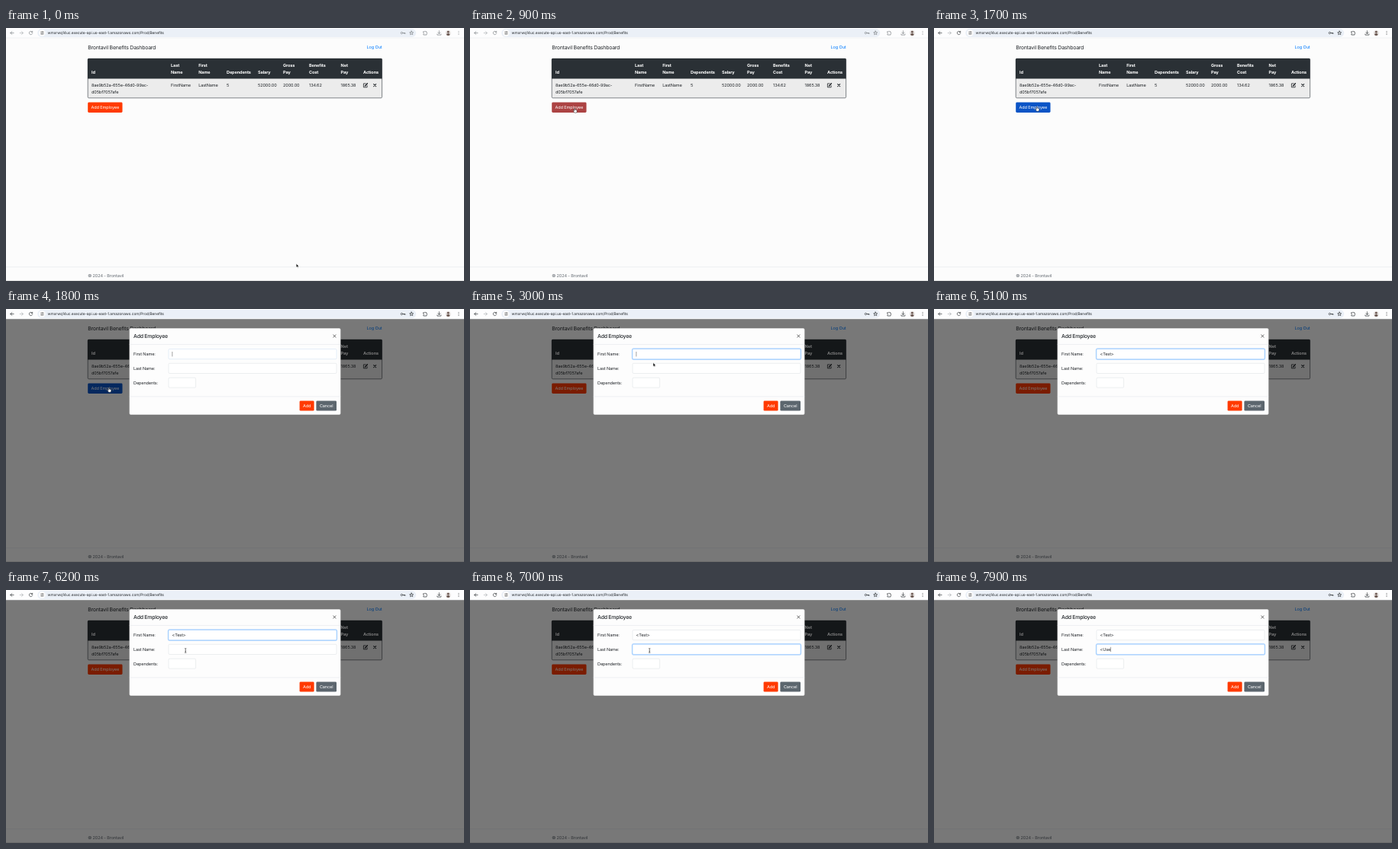
An HTML page that plays this animation: 600 px wide and 332 px high, repeating every 8 s.

```html
<!DOCTYPE html>
<html lang="en">
<head>
<meta charset="utf-8">
<title>Benefits Dashboard</title>
<style>
html, body { margin: 0; width: 100%; height: 100%; overflow: hidden; background: #fcfcfc; }
svg { display: block; width: 100vw; height: 100vh; }
text { font: 400 5.55px Inter, "Open Sans", sans-serif; letter-spacing: -.02em; fill: #212529; text-rendering: geometricPrecision; white-space: pre; }
.th { font-weight: 700; fill: #fff; }
.brand { font-size: 6.94px; letter-spacing: -.032em; }
.title { font-size: 6.94px; font-weight: 500; letter-spacing: -.034em; }
.url { font-size: 4.86px; letter-spacing: -.01em; }
.light { fill: #fff; }
.mid { text-anchor: middle; }
.line { fill: none; stroke-width: .75; stroke-linecap: round; stroke-linejoin: round; }
.input { fill: #fff; stroke: #ced4da; stroke-width: .4; }
</style>
</head>
<body>
<svg id="stage" viewBox="0 0 600 332" preserveAspectRatio="none">
  <rect width="600" height="332" fill="#fcfcfc"/>

  <g id="page">
    <text class="brand" x="107.2" y="27.5">Brontavil Benefits Dashboard</text>
    <text x="472.6" y="27" style="fill:#007bff">Log Out</text>
    <rect x="107.2" y="40.2" width="385.4" height="51.6" rx="1.4" fill="#ececec" stroke="#32383e" stroke-width=".6"/>
    <path d="M107 66.6V41.4q0-1.4 1.4-1.4H491.3q1.4 0 1.4 1.4V66.6Z" fill="#2a3035"/>
    <g id="table"></g>
    <g class="line" stroke="#212529" style="stroke-width:.8">
      <path d="M471.2 72.9H468.4V77.8H473.1V75.6"/>
      <path d="M470.4 75.9L473.4 72.7" style="stroke-width:1.4"/>
      <path d="M481.7 73.7L484.7 76.7M484.7 73.7L481.7 76.7" style="stroke-width:1.1"/>
    </g>
    <rect id="open" x="107.2" y="97.5" width="45.3" height="13.4" rx="1.4"/>
    <text class="light mid" x="129.8" y="106.3">Add Employee</text>
    <path d="M0 313.6H600" stroke="#dee2e6" stroke-width=".5"/>
    <text x="107.2" y="326.6" style="fill:#666d74">© 2024 - Brontavil</text>
    <rect y="331.4" width="600" height=".6" fill="#cfcfcf"/>
  </g>

  <g id="modal">
    <rect y="13" width="600" height="319" fill="#000" opacity=".52"/>
    <rect x="161.6" y="25.2" width="276.8" height="113.6" rx="1.7" fill="#fdfdfd" stroke="#000" stroke-opacity=".2" stroke-width=".4"/>
    <text class="title" x="167" y="38.3">Add Employee</text>
    <path class="line" d="M428.8 33.9L432 37.1M432 33.9L428.8 37.1" stroke="#333"/>
    <path d="M161.6 46.5H438.4M161.6 114.9H438.4" stroke="#dee2e6" stroke-width=".5"/>
    <text x="167" y="61.2">First Name:</text>
    <text x="167" y="79.9">Last Name:</text>
    <text x="167" y="98.7">Dependents:</text>
    <g id="fields"></g>
    <rect class="input" x="213" y="90.2" width="35.6" height="13" rx="1.4"/>
    <rect x="384.6" y="120.4" width="19" height="13.2" rx="1.4" fill="#ff3a00"/>
    <text class="light mid" x="394.1" y="129">Add</text>
    <rect x="406.4" y="120.4" width="26.6" height="13.2" rx="1.4" fill="#5c666e"/>
    <text class="light mid" x="419.7" y="129">Cancel</text>
  </g>

  <g id="toolbar">
    <rect width="600" height="13" fill="#fdfdfe"/>
    <path d="M0 13H600" stroke="#e3e5e8" stroke-width=".5"/>
    <rect x="41.2" y="1.1" width="496" height="10.8" rx="5.4" fill="#ebf0f7"/>
    <circle cx="47.4" cy="6.5" r="4.2" fill="#fff"/>
    <path class="line" d="M45.6 5.3H47M48.6 5.3H49.3M45.6 7.7H46.3M47.9 7.7H49.3" stroke="#444"/>
    <circle cx="47.8" cy="5.3" r=".7" fill="#444"/>
    <circle cx="47.1" cy="7.7" r=".7" fill="#444"/>
    <text class="url" x="54.6" y="8.3">wmxrwq14uc.execute-api.us-east-1.amazonaws.com/Prod/Benefits</text>
    <path class="line" d="M18.2 6.5H22.4M20.5 4.5L22.5 6.5L20.5 8.5" stroke="#b4b7ba"/>
    <g id="icons" class="line">
      <path d="M10.1 6.5H5.9M7.8 4.5L5.8 6.5L7.8 8.5"/>
      <path d="M34.4 5.2A2.2 2.2 0 1 0 34.7 7M34.7 4.2V5.5H33.3"/>
      <circle cx="518.4" cy="6.5" r="1.2"/>
      <path d="M519.7 6.5H523V7.5M521.6 6.5V7.4"/>
      <path id="star"/>
      <path d="M546.9 4.8H548.2A.9 .9 0 0 1 549.9 4.8H551V6A.9 .9 0 0 1 551 7.7V9H546.9V7.6A.9 .9 0 0 0 546.9 6Z"/>
      <path d="M567.4 3.7V7.3M565.8 5.9L567.4 7.5L569 5.9M564.9 8V9.1H569.9V8"/>
      <path d="M593 4.6V4.61M593 6.5V6.51M593 8.4V8.41" style="stroke-width:1"/>
    </g>
    <circle cx="579.3" cy="6.5" r="3.4" fill="#e6e2e0"/>
    <circle cx="579.3" cy="5.2" r="1.4" fill="#6a5650"/>
    <path d="M577 9Q577 6.9 579.3 6.9T581.6 9Q579.3 10.8 577 9Z" fill="#6a5650"/>
  </g>

  <g id="cursor" stroke-linejoin="round">
    <path id="arrow" d="M0 0V4.9L1.1 3.9L1.9 5.6L2.6 5.3L1.9 3.7H3.4Z" fill="#000" stroke="#fff" stroke-width=".45"/>
    <path id="hand" d="M-.5 .4Q0-.5 .5 .4V2Q1.2 1.7 1.5 2.3Q2.2 2 2.4 2.6Q3.1 2.5 3.1 3.2V4.4Q2.8 5.2 2.5 6H-.2Q-.8 5-2 3.6Q-1.6 2.7-.5 3.5Z" fill="#fff" stroke="#111" stroke-width=".45"/>
    <path id="beam" d="M-1.1-2.9Q0-2.9 0-2.2Q0-2.9 1.1-2.9M0-2.2V2.2M-1.1 2.9Q0 2.9 0 2.2Q0 2.9 1.1 2.9M-.6 .9H.6" fill="none" stroke="#222" stroke-width=".6"/>
  </g>
</svg>

<script>
const LOOP = 8000, OPEN = 1790, SWITCH = 6300, BLINK = 500;
const $ = id => document.getElementById(id);

function add(parent, tag, attrs, text = '') {
  const el = document.createElementNS('http://www.w3.org/2000/svg', tag);
  for (const key in attrs) el.setAttribute(key, attrs[key]);
  el.textContent = text;
  parent.append(el);
  return el;
}

// x, heading lines, cell lines
const columns = [
  [112, 'Id', '8ae9b52a-655e-46d0-99ac-|d05bf7057afe'],
  [216, 'Last|Name', 'FirstName'],
  [252.2, 'First|Name', 'LastName'],
  [289, 'Dependents', '5'],
  [330, 'Salary', '52000.00'],
  [363, 'Gross|Pay', '2000.00'],
  [397, 'Benefits|Cost', '134.62'],
  [438.6, 'Net|Pay', '1865.38'],
  [468, 'Actions', '']
];
for (const [x, head, cell] of columns) {
  head.split('|').reverse().forEach((s, i) => add($('table'), 'text', { x, y: 59.7 - i * 8.33, class: 'th' }, s));
  cell.split('|').forEach((s, i) => add($('table'), 'text', { x, y: 77.2 + i * 8.33 }, s));
}

const star = Array.from({ length: 10 }, (_, i) => {
  const r = i % 2 ? 1.15 : 2.6, a = i * Math.PI / 5;
  return `${531.2 + r * Math.sin(a)} ${6.6 - r * Math.cos(a)}`;
});
$('star').setAttribute('d', `M${star.join('L')}Z`);

const clamp = v => Math.max(0, Math.min(1, v));
const ramp = (t, a, b) => clamp((t - a) / (b - a));
const ease = p => p * p * (3 - 2 * p);
const mix = (a, b, p) => a + (b - a) * p;
const rgb = (a, b, p) => `rgb(${a.map((v, i) => Math.round(mix(v, b[i], p)))})`;
const show = (el, on) => el.setAttribute('visibility', on ? 'visible' : 'hidden');

function makeField(y, value, keys, from, to) {
  const box = { x: 213, y, width: 220, height: 13.2, rx: 1.4 };
  const glow = add($('fields'), 'rect', { ...box, fill: 'none', stroke: '#007bff', 'stroke-opacity': .27, 'stroke-width': 2.4 });
  const frame = add($('fields'), 'rect', { ...box, class: 'input' });
  const label = add($('fields'), 'text', { x: 217.6, y: y + 8.6 });
  const caret = add($('fields'), 'rect', { y: y + 3.5, width: .45, height: 6.4, fill: '#333' });
  return t => {
    const focus = ramp(t, from + 30, from + 180) - ramp(t, to, to + 150);
    const typed = keys.filter(k => t >= k);
    label.textContent = value.slice(0, typed.length);
    glow.setAttribute('opacity', focus);
    frame.style.stroke = rgb([190, 212, 236], [118, 182, 255], focus);
    if (t < from || t > to + 150) frame.style.stroke = '#ced4da';
    const last = typed.length ? typed[typed.length - 1] : from;
    const lit = t >= from && t < to && Math.floor((t - last) / BLINK) % 2 === 0;
    caret.setAttribute('x', 217.7 + (typed.length ? label.getComputedTextLength() : 0));
    caret.setAttribute('opacity', lit ? 1 : 0);
  };
}
const fields = [
  makeField(52.5, '<Test>', [3300, 3680, 3980, 4120, 4300, 4490], OPEN, SWITCH),
  makeField(71.3, '<User>', [7090, 7480, 7690, 7890], SWITCH, LOOP + 200)
];

// time, x, y
const path = [
  [0, 380.3, 309.2], [100, 380.3, 309.2], [950, 134.7, 103.2], [1900, 134.7, 103.2],
  [2600, 240, 70.5], [5600, 240, 70.5], [6180, 235.2, 79.5], [LOOP, 235.2, 79.5]
];
function pointer(t) {
  const i = path.findIndex(p => p[0] > t);
  const [t0, x0, y0] = path[i - 1], [t1, x1, y1] = path[i];
  const p = ease(ramp(t, t0, t1));
  return [mix(x0, x1, p), mix(y0, y1, p)];
}

function draw(t) {
  const [x, y] = pointer(t);
  const over = t < 1900 && x < 152.5 && y < 111;
  const beam = t > 5600 && y > 72;
  $('cursor').setAttribute('transform', `translate(${x} ${y})`);
  const seen = t < 3300 || (t >= 5600 && t < 7090);
  show($('arrow'), seen && !over && !beam);
  show($('hand'), seen && over);
  show($('beam'), seen && beam);

  const hover = ramp(t, 850, 1000) - ramp(t, 1900, 2050);
  $('open').setAttribute('fill', rgb([255, 58, 0], [11, 84, 198], hover));
  $('icons').setAttribute('stroke', t < 1000 ? '#85898d' : '#3c4043');
  $('modal').setAttribute('display', t < OPEN ? 'none' : 'inline');
  fields.forEach(update => update(t));
}

function tick() {
  draw(performance.now() % LOOP);
  requestAnimationFrame(tick);
}
tick();
</script>
</body>
</html>
```
